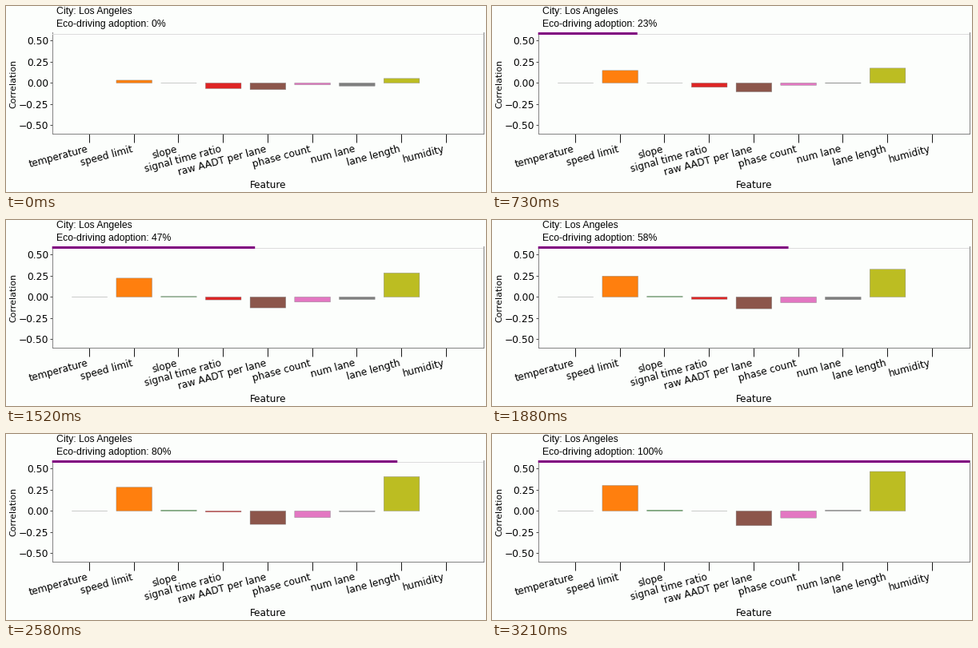
A matplotlib script for the animation above (3270 ms loop, 600 px wide and 233 px high).

```python
from math import exp, pi, sin

import numpy as np
import matplotlib.pyplot as plt
from matplotlib.animation import FuncAnimation
from matplotlib.patches import Rectangle

W, H, DPI = 600, 233, 100
TICKS, TICK_MS = 109, 30
PT = 72 / DPI  # points per pixel
LEFT, RIGHT, TOP, BOTTOM = 57.7, 597.1, 32.9, 160.0

plt.rcParams["font.family"] = "DejaVu Sans"


def rise(start, end, rate, delay=0.0):
    """Curve from start to end that flattens out as adoption grows."""
    def value(p):
        u = max(0.0, (p - delay) / (1 - delay))
        return start + (end - start) * (1 - exp(-rate * u)) / (1 - exp(-rate))
    return value


def wobble(p):
    """Rises to zero with a fading swing."""
    return -0.036 * (1 - p) + 0.035 * exp(-1.3 * p) * sin(2.5 * pi * p)


# Correlation as a function of the adoption share
FEATURES = [
    ("temperature", "#1f77b4", lambda p: 0),
    ("speed limit", "#ff7f0e", rise(.033, .302, 2)),
    ("slope", "#2ca02c", rise(0, .010, 3, .23)),
    ("signal time ratio", "#de2424", rise(-.066, 0, .1)),
    ("raw AADT per lane", "#8c564b", rise(-.078, -.173, .5)),
    ("phase count", "#e377c2", rise(-.021, -.082, 2.5, .2)),
    ("num lane", "#7f7f7f", wobble),
    ("lane length", "#bcbd22", rise(.053, .467, .7)),
    ("humidity", "#17becf", None),
]

fig = plt.figure(figsize=(W / DPI, H / DPI), dpi=DPI, facecolor="#fcfefc")
ax = fig.add_axes([LEFT / W, 1 - BOTTOM / H, (RIGHT - LEFT) / W, (BOTTOM - TOP) / H],
                  facecolor="none")


def put_text(x, y, text, size, **kw):
    return fig.text(x / W, 1 - y / H, text, fontsize=size * PT, **kw)


def put_strip(top, bottom, color):
    strip = Rectangle((LEFT / W, 1 - bottom / H), (RIGHT - LEFT) / W,
                      (bottom - top) / H, facecolor=color, lw=0, snap=False,
                      transform=fig.transFigure)
    return fig.add_artist(strip)


count = len(FEATURES)
ax.set_xlim(-0.84, count - 0.16)
ax.set_ylim(-0.6, 0.6)
ax.set_yticks(np.arange(-0.5, 0.51, 0.25))
ax.yaxis.set_major_formatter("{x:.2f}")
# Ticks sit half a pixel left so that they snap to the bar centres
ax.set_xticks(np.arange(count) - 0.009, [name for name, _, _ in FEATURES],
              rotation=15, ha="right")
ax.tick_params(axis="x", length=11 * PT, width=0.9 * PT, pad=2 * PT,
               labelsize=12.1 * PT)
ax.tick_params(axis="y", length=3 * PT, width=0.7 * PT, pad=1.5 * PT,
               labelsize=12.2 * PT)
ax.spines["top"].set_visible(False)
for side in ("left", "bottom", "right"):
    ax.spines[side].set(linewidth=0.9 * PT, edgecolor="#777777")

bars = []
for i, (_, color, curve) in enumerate(FEATURES):
    if curve:
        bar = Rectangle((i - 0.4, 0), 0.8, 0, facecolor=color,
                        edgecolor="#808080", lw=0.4 * PT, snap=False)
        bars.append((ax.add_patch(bar), curve))

put_text(63.4, 10, "City: Los Angeles", 12.3, family="Liberation Sans")
adoption = put_text(63.4, 26, "", 12.3, family="Liberation Sans")
put_text(328, 228.5, "Feature", 12, ha="center")
put_text(9.5, 97.5, "Correlation", 11, rotation=90, ha="center", va="center")

put_strip(35, 36, "#dcdcdc")
progress = put_strip(33, 36, "#800080")


def update(tick):
    percent = int(0.9275 * tick + 0.78)
    share = percent / 100
    adoption.set_text(f"Eco-driving adoption: {percent}%")
    progress.set_width((RIGHT - LEFT) / W * share)
    for bar, curve in bars:
        bar.set_height(curve(share))
    bars[0][0].set_visible(percent > 0)
    return []


anim = FuncAnimation(fig, update, frames=TICKS, interval=TICK_MS,
                     repeat=True, repeat_delay=0, blit=False)
plt.show()
```
